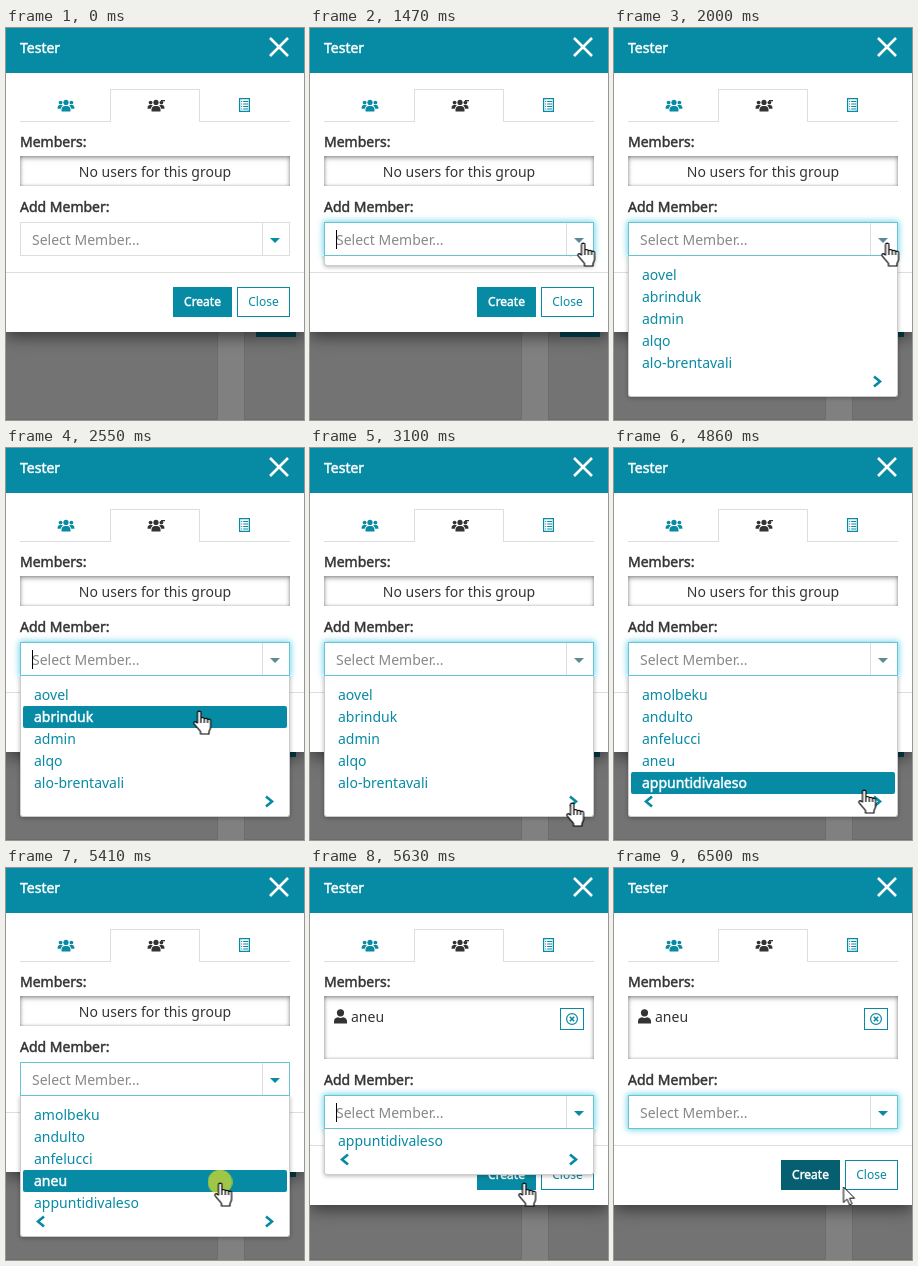
These frames come from a looping animation (298x392 px, 6.57 s). An HTML page:

```html
<!DOCTYPE html>
<html lang="en">
<head>
<meta charset="utf-8">
<title>Add a member</title>
<style>
  :root { --teal: #078aa3; --line: #ddd; }
  * { box-sizing: border-box; }
  html, body { margin: 0; width: 100%; height: 100%; overflow: hidden; }
  body { position: relative; background: #808080; color: #333; font: 14px/20px "Noto Sans", "Open Sans", sans-serif; }
  div, svg { position: absolute; }
  svg { overflow: visible; }
  .t { white-space: pre; }
  .bold { -webkit-text-stroke: .45px currentColor; }

  .panel { top: 0; height: 392px; background: #737373; border: 1px solid #6c6c6c; }
  #strip { left: 250px; top: 280px; width: 40px; height: 29px; background: #034551; }
  #modal { position: relative; width: 298px; background: #fff; box-shadow: 0 5px 15px rgba(0,0,0,.5); }
  #head { width: 298px; height: 45px; background: var(--teal); color: #fff; }
  #tabline { left: 14px; top: 93px; width: 270px; height: 1px; background: var(--line); }
  #tab { left: 104px; top: 61px; width: 90px; height: 33px; background: #fff; border: 1px solid var(--line); border-bottom: 0; }
  #top { position: relative; height: 128px; }
  #box { position: relative; margin-left: 14px; width: 270px; height: 30px;
         box-shadow: inset 0 2px 5px rgba(0,0,0,.38), inset 0 0 3px rgba(0,0,0,.25); }
  #none { width: 270px; top: 6px; text-align: center; }
  #remove { left: 236px; top: 12px; width: 24px; height: 22px; border: 1px solid var(--teal); background: #fff; }

  #lower { position: relative; height: 146px; }
  #field { left: 14px; top: 36px; width: 270px; height: 34px; background: #fff; border: 1px solid var(--line); }
  #glow { left: -1px; top: -1px; width: 270px; height: 34px; border: 1px solid #66c4d5; box-shadow: 0 0 6px 1px rgba(70,200,225,.75); }
  #split { left: 241px; top: 0; width: 1px; height: 32px; background: var(--line); }
  #caret { left: 11px; top: 7px; width: 1px; height: 19px; background: #000; }
  #rule { top: 86px; width: 298px; height: 1px; background: var(--line); }
  .btn { top: 101px; height: 30px; border: 1px solid var(--teal); font-size: 12px; line-height: 28px; text-align: center; }
  #create { left: 167px; width: 59px; background: var(--teal); color: #fff; }
  #close { left: 231px; width: 53px; color: var(--teal); }

  #clip { left: 14px; top: 70px; width: 270px; height: 141px; clip-path: inset(0 -10px -10px -10px); }
  #popup { width: 270px; height: 141px; background: #fff; border: 1px solid #ccc; border-top: 0;
           border-radius: 0 0 3px 3px; box-shadow: 0 1px 4px rgba(0,0,0,.3); color: var(--teal); }
  .row { left: 2px; width: 264px; height: 22px; padding-left: 11px; line-height: 21px; white-space: pre; }
  .hot { background: var(--teal); color: #fff; border-radius: 2px; }
  #pointer { left: 0; top: 0; }
</style>
</head>
<body>
<svg width="0" height="0">
  <symbol id="people" viewBox="0 0 18 13" overflow="visible">
    <circle cx="3.6" cy="3.6" r="1.9"/><circle cx="14.4" cy="3.6" r="1.9"/>
    <path d="M.6 9.8V8.6C.6 7 1.6 6 3 6h1.6c.6 0 1 .2 1.4.5C4.8 7.2 4 8.400 3.800 9.800zM17.400 9.800V8.600C17.400 7 16.400 6 15 6h-1.600c-.6 0-1 .2-1.400.5 1.200.7 2 1.900 2.200 3.300z"/>
    <circle cx="9" cy="3.400" r="2.600"/>
    <path d="M4.500 12.400v-1.800C4.500 8.400 6 6.900 8 6.900h2c2 0 3.500 1.500 3.500 3.700v1.800z"/>
  </symbol>
</svg>

<div class="panel" style="left:-2px;width:214px"></div>
<div class="panel" style="left:238px;width:64px"></div>
<div id="strip"></div>

<div id="modal">
  <div id="top">
    <div id="head"><div class="t bold" style="left:14px;top:10px">Tester</div></div>
    <svg style="left:263px;top:9px" width="20" height="20" stroke="#fff" stroke-width="2.6"><path d="M1 1 19 19M19 1 1 19"/></svg>
    <div id="tabline"></div>
    <div id="tab"></div>
    <svg style="left:51px;top:71px" width="18" height="13" fill="#078aa3"><use href="#people"/></svg>
    <svg style="left:141px;top:71px" width="18" height="13" fill="#333"><use href="#people"/><path d="M14 1h4v1.300h-4z"/></svg>
    <svg style="left:233px;top:70px" width="11" height="14" fill="none" stroke="#078aa3">
      <path d="M.6.6h9.800v12.800H.6z" stroke-width="1.200"/>
      <path d="M2.200 3.500h1M4.200 3.500h5M2.200 6h1M4.200 6h5M2.200 8.500h1M4.200 8.500h5M2.200 11h1M4.200 11h5"/>
    </svg>
    <div class="t bold" style="left:14px;top:104px">Members:</div>
  </div>

  <div id="box">
    <div id="none" class="t">No users for this group</div>
    <div id="member">
      <svg style="left:10px;top:13px" width="13" height="15" fill="#333">
        <circle cx="6.500" cy="3.800" r="3.600"/><path d="M0 14.500v-2C0 10 1.500 8.600 4 8.300c1.500 1 3.500 1 5 0 2.500.3 4 1.700 4 4.200v2z"/>
      </svg>
      <div class="t" style="left:27px;top:11px">aneu</div>
      <div id="remove">
        <svg style="left:5px;top:4px" width="12" height="12" fill="none" stroke="#078aa3" stroke-width="1.200">
          <circle cx="6" cy="6" r="5.400"/><path d="M3.800 3.800 8.200 8.200M8.200 3.800 3.800 8.200" stroke-width="1.600"/>
        </svg>
      </div>
    </div>
  </div>

  <div id="lower">
    <div class="t bold" style="left:14px;top:11px">Add Member:</div>
    <div id="field">
      <div id="glow"></div>
      <div class="t" style="left:11px;top:7px;color:#888">Select Member...</div>
      <div id="caret"></div>
      <div id="split"></div>
      <svg style="left:249px;top:15px" width="10" height="5"><path id="arrow" fill="#078aa3" d="M0 0h10L5 5z"/></svg>
    </div>
    <div id="rule"></div>
    <div id="create" class="btn bold">Create</div>
    <div id="close" class="btn">Close</div>
    <div id="clip"><div id="popup">
      <svg width="270" height="141" fill="none" stroke="#078aa3" stroke-width="2.600">
        <path id="prev" d="M23 120.500 17 125.500 23 130.500"/><path d="M245 120.500 251 125.500 245 130.500"/>
      </svg>
    </div></div>
  </div>
</div>

<svg id="pointer" width="20" height="26">
  <circle id="tap" cx="6.500" cy="0" r="12.300" fill="rgba(255,235,15,.62)"/>
  <path id="hand" fill="#fff" stroke="#000" stroke-width="1.200" stroke-linejoin="round"
    d="M5 13V2.800a1.700 1.700 0 0 1 3.400 0V9a1.700 1.700 0 0 1 3.400.4 1.700 1.700 0 0 1 3.300.6 1.600 1.600 0 0 1 3 .9V17c0 2-1 3-1.600 4.500V24H8v-2.500C6.500 19 3 16 1.600 13.800c-1-1.600 1-2.800 2.200-1.600zM8.400 9v4M11.800 9.500V13M15.100 10.200V13"/>
  <path id="tip" fill="#fff" stroke="#000" d="M7 1v15.500l3.600-3.400 2.500 5.800 2.500-1.100-2.500-5.600h5z"/>
</svg>

<script>
const LOOP = 6570;
const $ = id => document.getElementById(id);

// Hard steps: [time, value] pairs, each held until the next.
function play(el, prop, steps) {
  const frames = steps.map(([t, v]) => ({ offset: t / LOOP, [prop]: v, easing: 'step-end' }));
  frames.push({ offset: 1, [prop]: steps[steps.length - 1][1] });
  el.animate(frames, { duration: LOOP, iterations: Infinity });
}

// Visible only in the given [from, to] spans.
function show(el, ...spans) {
  const steps = spans[0][0] ? [[0, 0]] : [];
  for (const [from, to] of spans) {
    steps.push([from, 1]);
    if (to) steps.push([to, 0]);
  }
  play(el, 'opacity', steps);
}

const pages = [
  ['aovel', 'abrinduk', 'admin', 'alqo', 'alo-brentavali'],
  ['albortaque', 'alvi-ron', 'allthatwalks', 'alno', 'amk_407'],
  ['amolbeku', 'andulto', 'anfelucci', 'aneu', 'appuntidivaleso']
];
const turns = [[0, 3530], [3530, 4260], [4260]];

function addRow(parent, page, row, hot) {
  const el = document.createElement('div');
  el.className = hot ? 'row hot bold' : 'row';
  el.style.top = 8 + row * 22 + 'px';
  el.textContent = pages[page][row];
  parent.append(el);
  return el;
}

pages.forEach((names, p) => {
  const list = document.createElement('div');
  list.style.cssText = 'left:0;top:0;width:268px';
  $('popup').append(list);
  names.forEach((_, r) => addRow(list, p, r));
  show(list, turns[p]);
});

// Hovered rows: from, to, page, row
[[2340, 2480, 0, 0], [2480, 2620, 0, 1], [2620, 2690, 0, 2], [2690, 2750, 0, 3], [2750, 2820, 0, 4],
 [4860, 5070, 2, 4], [5070, 5560, 2, 3]]
  .forEach(([from, to, p, r]) => show(addRow($('popup'), p, r, true), [from, to]));
show($('prev'), [3530]);

// Popup slides out from under the field and back
play($('popup'), 'transform', [
  [0, -160], [1470, -131], [1530, -80], [1600, -28], [1670, 0],
  [5560, -40], [5630, -95], [5700, -132], [5770, -160]
].map(([t, y]) => [t, `translateY(${y}px)`]));

const focus = [[1400, 3320], [3600, 4190], [4330, 5410]];
play($('glow'), 'boxShadow', [[0, 'none'],
  ...[...focus, [5630]].flatMap(([a, b]) => [
    [a, '0 0 6px 1px rgba(70,200,225,.75)'], ...(b ? [[b, 'none']] : [])
  ])]);
show($('glow'), [1400]);
play($('arrow'), 'fill', [[0, '#078aa3'],
  ...focus.flatMap(([a, b]) => [[a, '#5a8c98'], [b, '#078aa3']])]);
show($('caret'), [1470, 2000], [2530, 3060], [5630, 6100]);

// Member is added, the dialog grows
const added = 5560;
play($('box'), 'height', [[0, '30px'], [added, '63px']]);
show($('none'), [0, added]);
show($('member'), [added]);
play($('create'), 'backgroundColor', [[0, '#078aa3'], [5770, '#055f70']]);
play($('create'), 'borderColor', [[0, '#078aa3'], [5770, '#055f70']]);

// Pointer path: time, x, y of the finger tip
play($('pointer'), 'transform', [
  [0, 271, 225], [730, 271, 225], [800, 266, 217], [870, 260, 208], [930, 256, 203],
  [1130, 266, 210], [1200, 273, 215],
  [2200, 262, 222], [2270, 244, 230], [2340, 226, 240], [2410, 210, 250], [2480, 198, 259],
  [2550, 193, 263], [2620, 204, 284], [2690, 224, 312], [2750, 246, 338], [2820, 264, 360],
  [2890, 279, 363], [2960, 283, 362], [3030, 273, 358], [3100, 262, 355],
  [4790, 258, 350], [4860, 250, 342], [4930, 240, 334], [5000, 230, 327], [5070, 222, 320],
  [5140, 216, 316], [5210, 214, 315], [6500, 229, 319]
].map(([t, x, y]) => [t, `translate(${x - 6.5}px, ${y - 1}px)`]));
show($('hand'), [730, 6500]);
show($('tip'), [6500]);
show($('tap'), [1400, 1470], [3320, 3470], [4190, 4330], [5410, 5560]);
</script>
</body>
</html>
```
